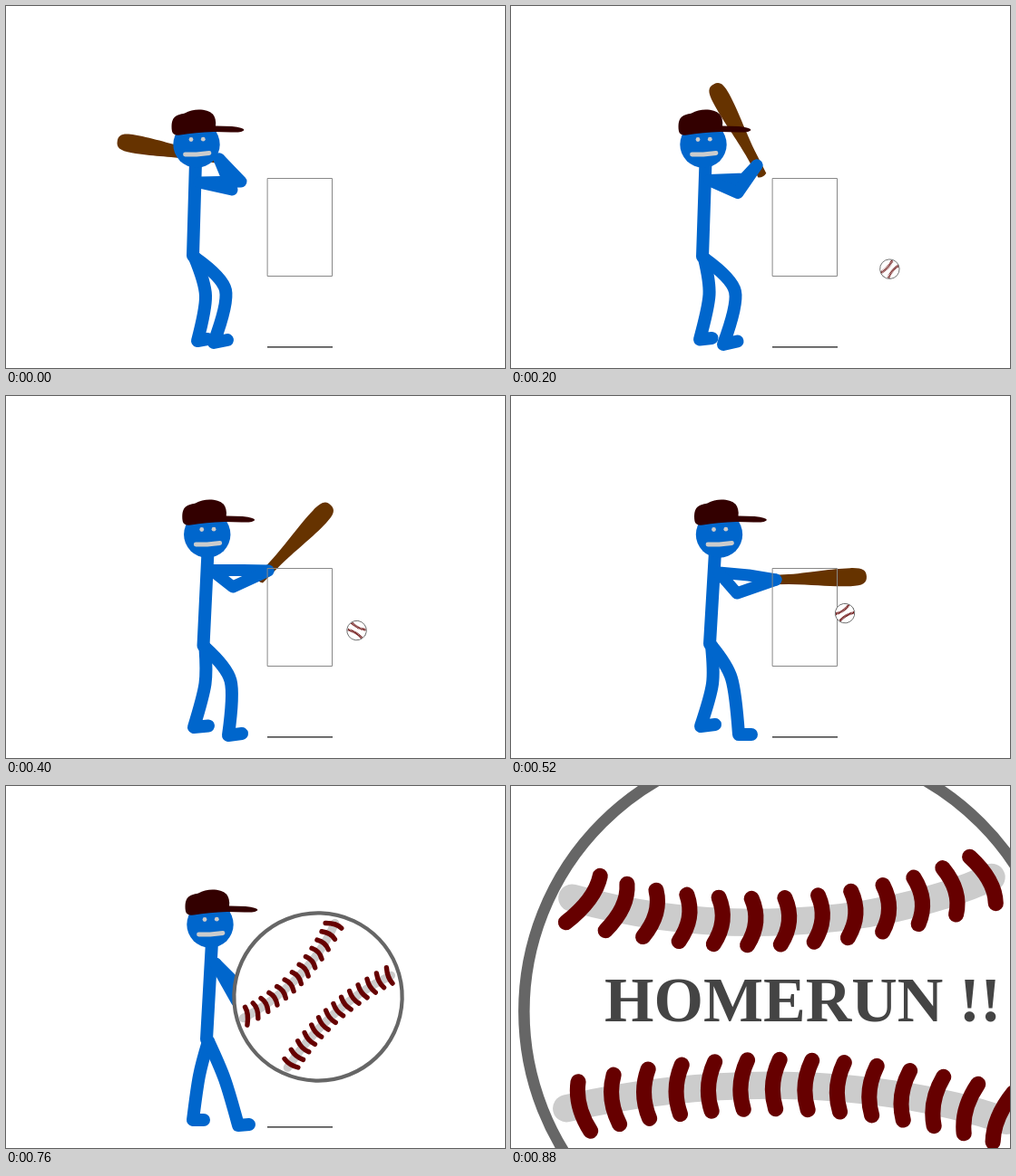
Animation of 550x400 px, one loop 1200 ms. Source, as an HTML page with a canvas:

```html
<!DOCTYPE html>
<html lang="en">
<head>
<meta charset="utf-8">
<title>Home run</title>
<style>
html, body { margin: 0; width: 100%; height: 100%; overflow: hidden; background: #fff; }
canvas { display: block; width: 550px; height: 400px; }
</style>
</head>
<body>
<canvas id="stage" width="550" height="400"></canvas>
<script>
const ctx = document.getElementById('stage').getContext('2d');
const LOOP = 1200, STEP = 40, PITCH = 160, HIT = 600, LAST = 880;
const BLUE = '#0066cc', BAT = 116;

// Legs are knee, heel, toe; bat is its angle and how far the knob sticks out of the hand.
const stance = {
  t: 0, head: [0], shoulder: [213, 195], hip: [208, 278],
  back: [220, 320, 211, 370, 222, 368], front: [242, 314, 229, 372, 244, 369],
  elbows: [259, 194, 249, 203], hand: [235, 169], bat: [190, 2]
};
const poses = [
  stance,
  { ...stance, t: 120, elbows: [252, 195, 249, 209], hand: [256, 169], bat: [215, 13] },
  {
    t: 280, head: [4], shoulder: [224, 190], hip: [218, 280],
    back: [217, 318, 205, 367, 221, 366], front: [252, 317, 239, 376, 255, 372],
    elbows: [262, 187, 251, 204], hand: [286, 183], bat: [269, 16]
  },
  {
    t: 520, head: [19.5], shoulder: [229, 195], hip: [221, 276],
    back: [222, 318, 209, 365, 225, 363], front: [243, 312, 251, 374, 265, 374],
    elbows: [262, 198, 249, 218], hand: [292, 203], bat: [358, 16]
  },
  {
    t: 680, head: [15], shoulder: [231, 196], hip: [223, 282],
    back: [213, 320, 206, 369, 218, 369], front: [241, 324, 256, 375, 268, 374],
    elbows: [252, 217, 254, 237], hand: [289, 230], bat: [369, 15]
  }
];

const capShape = new Path2D('M183 138C181 122 187 120 197 118C207 112 222 113 228 119' +
  'Q232 124 231 132L249 132.5Q262 134 262.5 136.5Q261 139.5 248 139' +
  'L229 138.5C215 139 203 140 192 142Q184 143 183 138Z');
const batShape = new Path2D('M2 -5L30 -5.5C60 -7 75 -10 98 -10C112 -10 116 -7 116 0' +
  'C116 7 112 10 98 10C75 10 60 7 30 5.5L2 5Q-1 0 2 -5Z');
const topSeam = new Path2D('M184 150C280 177 400 175 490 135');
const lowSeam = new Path2D('M180 304C280 281 400 279 501 313');

const rad = deg => deg * Math.PI / 180;

// Evenly spaced stitches; u runs from -1 to 1 along the seam.
function stitchRow(count, x0, gap, height, bow, midY, lean) {
  const p = new Path2D();
  for (let i = 0; i < count; i++) {
    const u = 2 * i / (count - 1) - 1;
    const x = x0 + gap * i, y = midY(u), dx = lean(u) / 2;
    p.moveTo(x + dx, y - height / 2);
    p.quadraticCurveTo(x + bow, y, x - dx, y + height / 2);
  }
  return p;
}
const topStitches = stitchRow(13, 192, 24.3, 34, 9,
  u => 167 - 7 * u - 23 * u * u, u => 3 - 22 * u ** 3);
const lowStitches = stitchRow(14, 193, 23.5, 36, -7,
  u => 286.5 + 4 * u + 20 * u * u, u => 3 + 12 * u ** 3);

function poseAt(t) {
  let i = poses.findIndex(p => p.t > t);
  if (i < 0) return poses[poses.length - 1];
  const a = poses[i - 1], b = poses[i], k = (t - a.t) / (b.t - a.t);
  const mixed = {};
  for (const part in a) {
    if (part !== 't') mixed[part] = a[part].map((v, j) => v + (b[part][j] - v) * k);
  }
  return mixed;
}

function stroke(path, color, width) {
  ctx.strokeStyle = color;
  ctx.lineWidth = width;
  ctx.stroke(path);
}

function fill(path, color) {
  ctx.fillStyle = color;
  ctx.fill(path);
}

function circle(x, y, r) {
  const p = new Path2D();
  p.arc(x, y, r, 0, Math.PI * 2);
  return p;
}

function polyline(...v) {
  const p = new Path2D();
  for (let i = 0; i < v.length; i += 2) p.lineTo(v[i], v[i + 1]);
  return p;
}

// Hip to knee and knee to heel bend softly, the foot is straight.
function leg([hx, hy], [kx, ky, ax, ay, tx, ty]) {
  const p = new Path2D(), sx = (ax - hx) * 0.15, sy = (ay - hy) * 0.15;
  p.moveTo(hx, hy);
  p.quadraticCurveTo(kx - sx, ky - sy, kx, ky);
  p.quadraticCurveTo(kx + sx, ky + sy, ax, ay);
  p.lineTo(tx, ty);
  return p;
}

function drawBatter(t) {
  const { head, shoulder, hip, back, front, elbows, hand, bat } = poseAt(t);
  const [ux, uy, lx, ly] = elbows;

  ctx.save();
  ctx.translate(...hand);
  ctx.rotate(rad(bat[0]));
  ctx.translate(-bat[1], 0);
  fill(batShape, '#663300');
  ctx.restore();

  stroke(leg(hip, back), BLUE, 14);
  stroke(leg(hip, front), BLUE, 14);
  stroke(polyline(shoulder[0] - 4, 172, hip[0] - 2, hip[1] - 2), BLUE, 14);

  // The arms overlap until the swing opens them.
  if (t < 400) fill(polyline(...shoulder, ux, uy, ...hand, lx, ly), BLUE);
  stroke(polyline(...shoulder, ux, uy, ...hand), BLUE, 13);
  stroke(polyline(...shoulder, lx, ly, ...hand), BLUE, 13);

  ctx.save();
  ctx.translate(head[0], 0.5);
  fill(circle(210, 152.5, 25.7), BLUE);
  fill(circle(204, 147, 2.4), '#cccccc');
  fill(circle(217.3, 146.7, 2.4), '#cccccc');
  stroke(polyline(197.5, 163.5, 210, 163.5, 224, 162), '#cccccc', 4.8);
  fill(capShape, '#330000');
  ctx.restore();
}

function drawZone() {
  ctx.strokeStyle = '#888888';
  ctx.lineWidth = 1;
  ctx.strokeRect(288.5, 190.5, 71, 108);
  ctx.fillStyle = '#555555';
  ctx.fillRect(288, 376, 72, 1.7);
}

function drawBall(x, y, scale, angle) {
  ctx.save();
  ctx.translate(x, y);
  ctx.rotate(rad(angle));
  ctx.scale(scale, scale);
  ctx.translate(-344, -233);
  const ring = circle(344, 233, 195), thread = Math.max(11.3, 0.9 / scale);
  fill(ring, '#ffffff');
  stroke(topSeam, '#cccccc', 20);
  stroke(lowSeam, '#cccccc', 20);
  stroke(topStitches, '#660000', thread);
  stroke(lowStitches, '#660000', thread);
  stroke(ring, '#666666', 8 + 0.4 / scale);
  ctx.restore();
}

function draw(t) {
  ctx.fillStyle = '#ffffff';
  ctx.fillRect(0, 0, 550, 400);
  ctx.lineCap = ctx.lineJoin = 'round';
  drawBatter(t);
  drawZone();
  if (t >= LAST) {
    drawBall(309, 249, 1.511, 0);
    ctx.fillStyle = '#444444';
    ctx.font = 'bold 70px "Liberation Serif", "Times New Roman", serif';
    ctx.fillText('HOMERUN !!', 103, 260);
  } else if (t >= HIT) {
    const k = ((t - HIT) / 240) ** 2;
    drawBall(344, 233, (11 + 188 * k) / 199, -78 * (1 - k));
  } else if (t >= PITCH) {
    const d = t - PITCH;
    drawBall(423.5 - 0.154 * d, 297 - 0.158 * d, 11 / 199, 152 - 0.51 * d);
  }
}

const start = performance.now();
function tick() {
  const t = (performance.now() - start) % LOOP;
  draw(Math.min(LAST, Math.floor(t / STEP) * STEP));
  requestAnimationFrame(tick);
}
tick();
</script>
</body>
</html>
```
